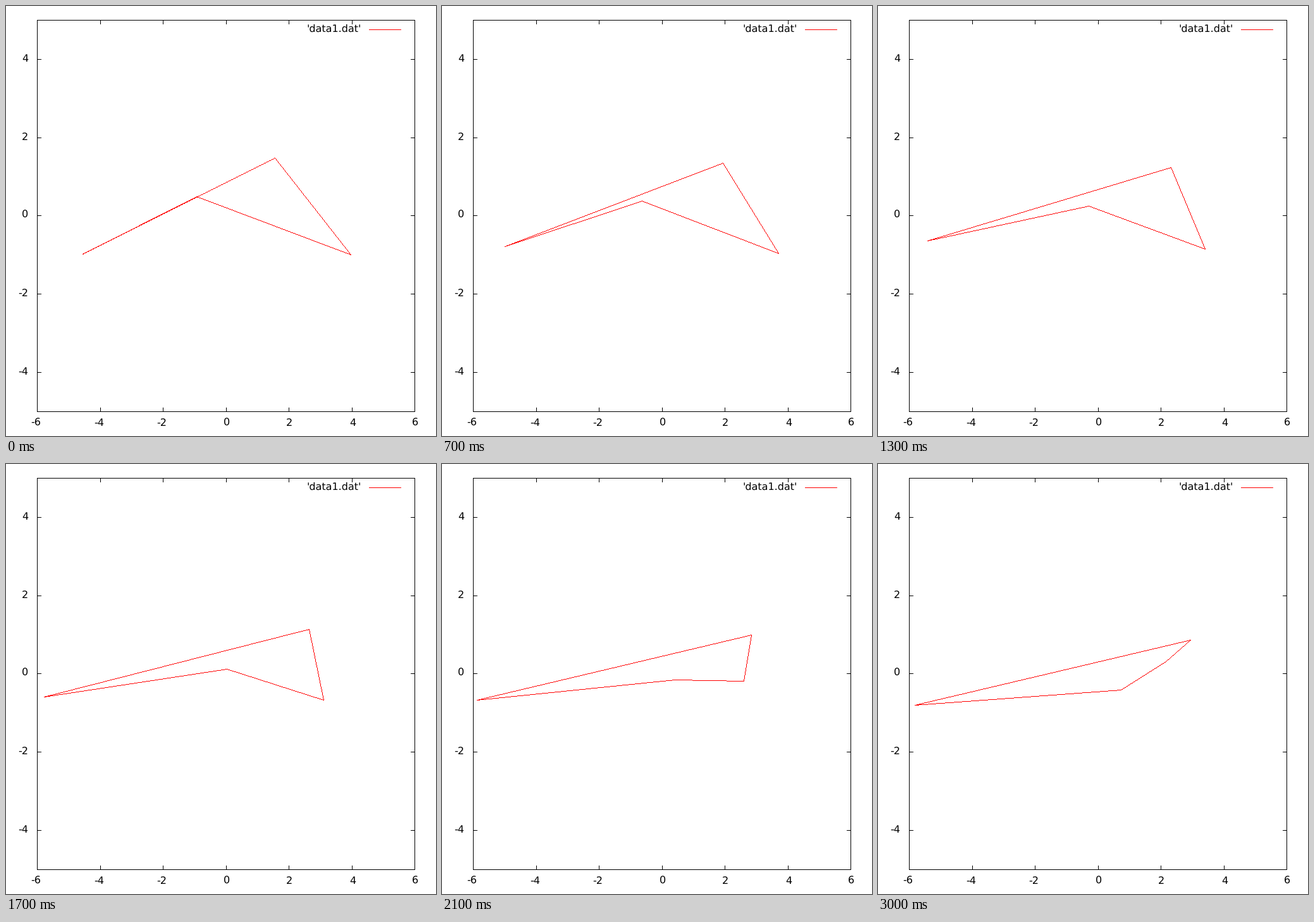
Write a matplotlib script that moves like this. It is 680 px wide and 680 px high and loops after 7000 ms.

```python
import numpy as np
import matplotlib.pyplot as plt
from matplotlib.animation import FuncAnimation

SIZE, DPI = 680, 100
LEFT, RIGHT, TOP, BOTTOM = 49, 646, 22, 641
TICK = 6
STEP_MS, STEPS = 100, 70
BLACK, RED = (0, 0, 0), (255, 0, 0)

# Four poses of the outline, passed at these steps; the last one is held.
POSE_STEPS = np.array([0, 13, 17, 26])
POSES = np.array([
    [(121, 392), (301, 301), (545, 393), (425, 240)],
    [(78, 371), (333, 316), (517, 384), (463, 255)],
    [(60, 368), (349, 324), (502, 373), (479, 261)],
    [(58, 381), (384, 357), (455, 312), (494, 278)],
], dtype=float)
VELOCITY = np.gradient(POSES, POSE_STEPS, axis=0)
VELOCITY[-1] = 0


def corners_at(step):
    """Cubic Hermite motion through the poses, coming to rest at the end."""
    step = min(step, POSE_STEPS[-1])
    i = max(np.searchsorted(POSE_STEPS, step) - 1, 0)
    h = POSE_STEPS[i + 1] - POSE_STEPS[i]
    t = (step - POSE_STEPS[i]) / h
    ease = t * t * (3 - 2 * t)
    return (POSES[i] + ease * (POSES[i + 1] - POSES[i])
            + h * t * (1 - t) * ((1 - t) * VELOCITY[i] - t * VELOCITY[i + 1]))


def draw_line(canvas, start, end, color):
    """Draw an aliased line, one pixel per step along its longer axis."""
    start, end = np.rint(start), np.rint(end)
    count = int(np.abs(end - start).max()) + 1
    x, y = np.rint(np.linspace(start, end, count)).astype(int).T
    canvas[y, x] = color


def add_text(x, y, text, align):
    fig.text(x / SIZE, 1 - y / SIZE, text, ha=align, va="baseline",
             color="black", family="DejaVu Sans", size=16 * 72 / DPI)


def draw_border(canvas):
    corners = [(LEFT, TOP), (RIGHT, TOP), (RIGHT, BOTTOM), (LEFT, BOTTOM)]
    for i, corner in enumerate(corners):
        draw_line(canvas, corner, corners[i - 1], BLACK)


def draw_ticks(canvas):
    for value in range(-6, 7, 2):
        x = int(LEFT + (value + 6) * (RIGHT - LEFT) / 12 + 0.5)
        draw_line(canvas, (x, TOP), (x, TOP + TICK), BLACK)
        draw_line(canvas, (x, BOTTOM), (x, BOTTOM - TICK), BLACK)
        add_text(x + (-1.5 if value < 0 else 1), 664, str(value), "center")
    for value in range(-4, 5, 2):
        y = int(TOP + (5 - value) * (BOTTOM - TOP) / 10 + 0.4)
        draw_line(canvas, (LEFT, y), (LEFT + TICK, y), BLACK)
        draw_line(canvas, (RIGHT, y), (RIGHT - TICK, y), BLACK)
        add_text(35.5, y + 4, str(value), "right")


def render(step):
    canvas = background.copy()
    corners = corners_at(step)
    for i, corner in enumerate(corners):
        draw_line(canvas, corners[i - 1], corner, RED)
    return canvas


plt.rcParams["text.hinting"] = "none"
fig = plt.figure(figsize=(SIZE / DPI, SIZE / DPI), dpi=DPI, facecolor="white")

background = np.full((SIZE, SIZE, 3), 255, dtype=np.uint8)
draw_border(background)
draw_ticks(background)
add_text(561.5, 41, "'data1.dat'", "right")
draw_line(background, (574, 37), (624, 37), RED)
picture = fig.figimage(render(0), origin="upper", zorder=-1)


def update(step):
    picture.set_data(render(step))
    return (picture,)


animation = FuncAnimation(fig, update, frames=STEPS, interval=STEP_MS,
                          repeat=True, repeat_delay=0, blit=False)
plt.show()
```
